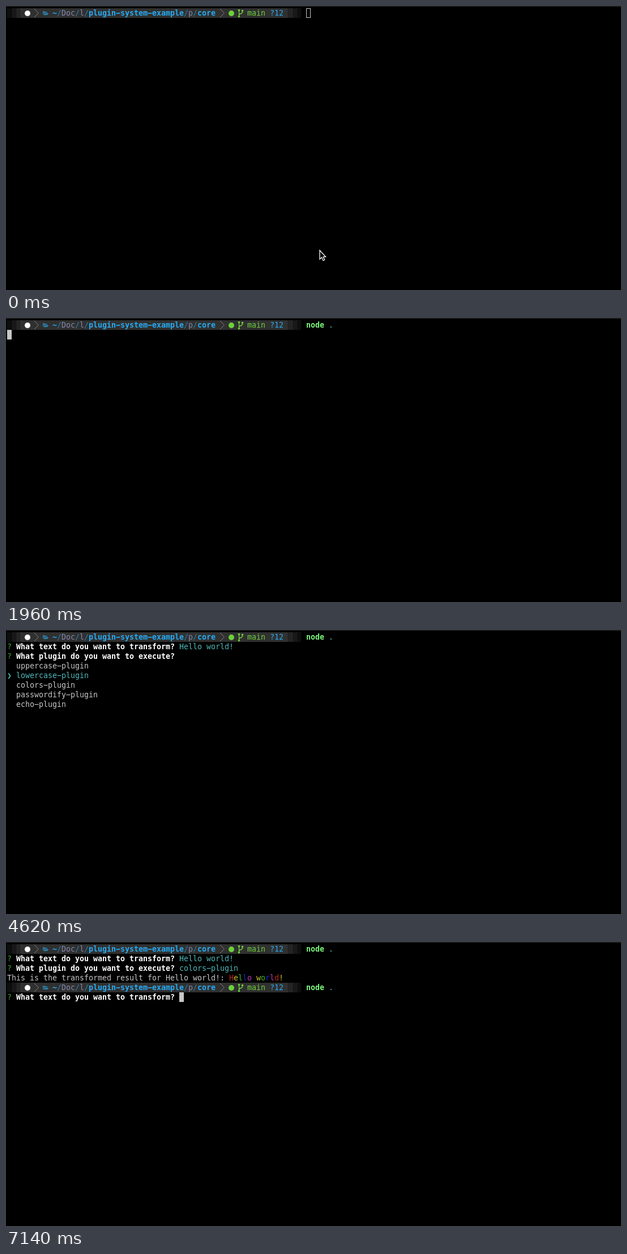
These frames come from a looping animation (1086 px wide and 502 px high, 8 s). An HTML page with a canvas:

```html
<!DOCTYPE html>
<html lang="en">
<head>
<meta charset="utf-8">
<title>Plugin system in a terminal</title>
<style>
  html, body { margin: 0; width: 100%; height: 100%; overflow: hidden; background: #000; }
  canvas { display: block; }
</style>
</head>
<body>
<canvas id="stage" width="1086" height="502"></canvas>
<script>
const ctx = document.getElementById('stage').getContext('2d');
const LOOP = 8000, TICK = 70;
const CELL_W = 8, CELL_H = 17, LEFT = 2, TOP = 4;
const COMMAND_COL = 66, ANSWER_COL = 38;
const C = {
  text: '#c7c7c7', white: '#fff', dim: '#686868', cyan: '#4fb9ba', ok: '#3fa535',
  command: '#7dfa7d', bar: '#303030', separator: '#808080',
  anchor: '#27aaf2', path: '#2682aa', folder: '#8787af', branch: '#6cd03a'
};
const RAINBOW = ['#c0271a', '#c7c430', '#35b52c', '#1828b8', '#b935b7'];
const PLUGINS = ['uppercase', 'lowercase', 'colors', 'passwordify', 'echo'].map(n => n + '-plugin');
const GREETING = 'Hello world!';

const colX = col => LEFT + col * CELL_W;
const rowY = row => TOP + row * CELL_H;

// Prints text on the cell grid; color may be a function of the character index.
function print(col, row, text, color = C.text, bold = false) {
  const y = rowY(row) + 13;
  ctx.font = `${bold ? 'bold ' : ''}13.3px "DejaVu Sans Mono", monospace`;
  [...text].forEach((ch, i) => {
    const x = colX(col + i);
    ctx.fillStyle = typeof color === 'function' ? color(i) : color;
    if (ch === '-') ctx.fillRect(x + 0.5, y - 5, 7, bold ? 1.7 : 1.2);
    else ctx.fillText(ch, x, y);
  });
}

function shade(col, row, level) {
  ctx.fillStyle = C.bar;
  for (let y = 0; y < CELL_H; y++) {
    for (let x = 0; x < CELL_W; x++) {
      const sparse = (x + 2 * y) % 4 === 0;
      const on = level === 1 ? sparse : level === 2 ? (x + y) % 2 : !sparse;
      if (on) ctx.fillRect(colX(col) + x, rowY(row) + y, 1, 1);
    }
  }
}

function disc(x, y, r, color) {
  ctx.fillStyle = color;
  ctx.beginPath();
  ctx.arc(x, y, r, 0, 2 * Math.PI);
  ctx.fill();
}

function stroke(d, color, width) {
  ctx.strokeStyle = color;
  ctx.lineWidth = width;
  ctx.stroke(new Path2D(d));
}

function icons(row) {
  ctx.save();
  ctx.translate(0, rowY(row));
  disc(38, 9, 5, C.white);
  for (const x of [50, 378]) stroke(`M${x} 1 l7.5 7.5 l-7.5 7.5`, C.separator, 1);
  ctx.fillStyle = C.path;
  ctx.fill(new Path2D('M65 11 V5.5 H69 L70 6.5 H73 V8 H67.5Z M65.5 12 L68 8.7 H75.5 L73 12Z'));
  disc(398, 9, 5, C.branch);
  stroke('M411.5 4 V15 M417.5 5 V6.5 Q417.5 9 414.5 9.5 Q411.5 10 411.5 13', C.branch, 1.3);
  for (const [x, y] of [[411.5, 3.5], [417.5, 4.5], [411.5, 14.5]]) disc(x, y, 1.8, C.branch);
  ctx.restore();
}

function prompt(row) {
  [1, 2, 3].forEach(level => {
    shade(level - 1, row, level);
    shade(65 - level, row, level);
  });
  ctx.fillStyle = C.bar;
  ctx.fillRect(colX(3), rowY(row), 59 * CELL_W, CELL_H);
  icons(row);
  print(10, row, '~', C.anchor, true);
  for (const col of [11, 15, 17, 39, 41]) print(col, row, '/', C.path);
  print(12, row, 'Doc', C.folder);
  print(16, row, 'l', C.folder);
  print(18, row, 'plugin-system-example', C.anchor, true);
  print(40, row, 'p', C.folder);
  print(42, row, 'core', C.anchor, true);
  print(53, row, 'main', C.branch);
  print(58, row, '?12', C.anchor);
}

function command(row, typed) {
  const known = typed.startsWith('node');
  print(COMMAND_COL, row, typed.slice(0, 4), known ? C.command : C.cyan, known);
  print(COMMAND_COL + 4, row, typed.slice(4), C.cyan);
}

function question(row, text, answer = '', color = C.cyan) {
  print(0, row, '?', C.ok);
  print(2, row, text, C.white, true);
  print(ANSWER_COL, row, answer, color);
}
const askText = (row, answer, color) =>
  question(row, 'What text do you want to transform?', answer, color);
const askPlugin = (row, answer, color) =>
  question(row, 'What plugin do you want to execute?', answer, color);

function cursor(col, row, hollow = false) {
  const x = colX(col), y = rowY(row);
  ctx.fillStyle = ctx.strokeStyle = C.text;
  ctx.lineWidth = 1;
  if (hollow) ctx.strokeRect(x + 0.5, y + 0.5, CELL_W - 1, CELL_H - 1);
  else ctx.fillRect(x, y, CELL_W, CELL_H);
}

function menu(row, selected) {
  PLUGINS.forEach((name, i) => {
    print(2, row + i, name, i === selected ? C.cyan : C.text);
  });
  print(0, row + selected, '❯', C.cyan);
}

function pointer(p) {
  const bend = (a, b, c) => (1 - p) ** 2 * a + 2 * p * (1 - p) * b + p * p * c;
  ctx.save();
  ctx.translate(bend(554, 675, 622), bend(432, 150, 100));
  const arrow = new Path2D('M0 0 V15.5 L3.5 12.3 L6 18 L8.6 16.8 L6.2 11.3 H10.5Z');
  ctx.fillStyle = '#000';
  ctx.fill(arrow);
  ctx.strokeStyle = C.white;
  ctx.lineWidth = 1.3;
  ctx.stroke(arrow);
  ctx.restore();
}

function commandAt(t) {
  if (t >= 1750) return 'node .';
  if (t >= 1050) return 'node ';
  return t < 840 ? '' : 'node'.slice(0, 1 + Math.floor((t - 840) / TICK));
}

function firstRun(t) {
  const typed = commandAt(t);
  prompt(0);
  command(0, typed);
  if (t < 1960) return cursor(COMMAND_COL + typed.length, 0, t < 350);
  if (t < 2240) return cursor(0, 1);

  const input = t < 3150 ? '' : GREETING;
  askText(1, input, t < 3640 ? C.text : C.cyan);
  if (t < 3640) return cursor(ANSWER_COL + input.length, 1);
  if (t < 3710) return cursor(0, 2);

  if (t < 5390) {
    askPlugin(2, t < 4620 ? '(Use arrow keys)' : '', C.dim);
    return menu(3, t < 4620 ? 0 : t < 4970 ? 1 : 2);
  }
  askPlugin(2, PLUGINS[2]);
  print(0, 3, `This is the transformed result for ${GREETING}:`);
  print(49, 3, GREETING, i => RAINBOW[i % RAINBOW.length]);
  secondRun(t);
}

function secondRun(t) {
  if (t < 5460) return cursor(0, 4);
  const typed = t < 6440 ? '' : 'node .';
  prompt(4);
  command(4, typed);
  if (t < 6930) return cursor(COMMAND_COL + typed.length, 4);
  if (t < 7070) return cursor(0, 5);
  askText(5);
  cursor(ANSWER_COL, 5);
}

function draw(t) {
  ctx.fillStyle = '#000';
  ctx.fillRect(0, 0, 1086, 502);
  ctx.fillStyle = '#2a2a2a';
  ctx.fillRect(0, 0, 1086, 1);
  firstRun(t);
  if (t < 840) pointer(Math.min(1, Math.floor(t / TICK) * TICK / 350));
}

const start = performance.now();
function tick() {
  draw((performance.now() - start) % LOOP);
  requestAnimationFrame(tick);
}
tick();
</script>
</body>
</html>
```
